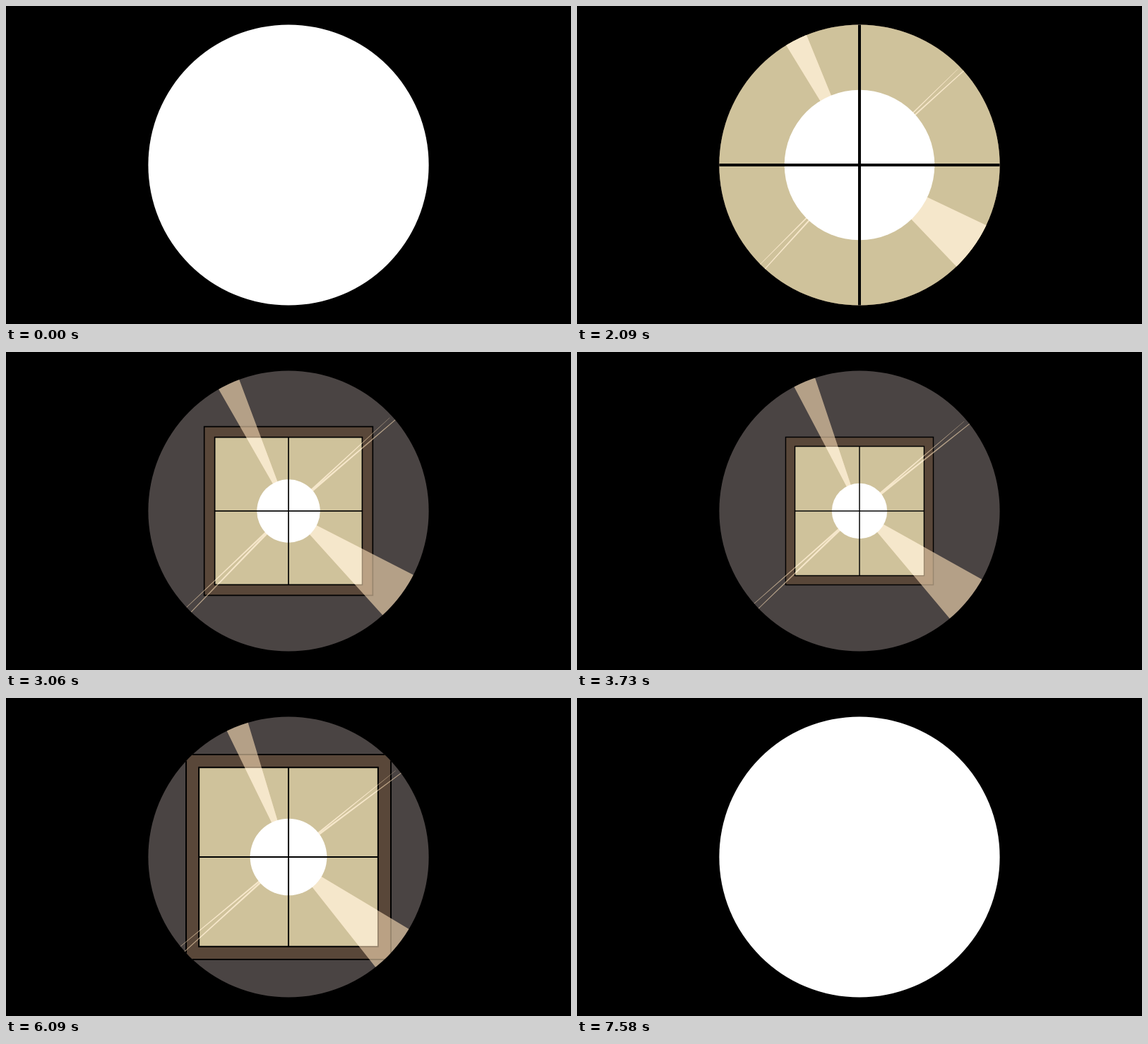
Write an HTML page with a canvas that moves like this. It is 800x450 px and loops after 8090 ms.

```html
<!DOCTYPE html>
<html lang="en">
<head>
<meta charset="utf-8">
<title>Window light</title>
<style>
  html, body { margin: 0; width: 100%; height: 100%; overflow: hidden; background: #000; }
  canvas { display: block; width: 800px; height: 450px; }
</style>
</head>
<body>
<canvas id="stage" width="800" height="450"></canvas>
<script>
const ctx = document.getElementById('stage').getContext('2d');
const LOOP = 8090;
const DISC = 198.6;          // radius of the round view
const NEAR = 235, FAR = 39.2; // lamp radius at both ends of the zoom
const RAD = Math.PI / 180;

const WALL = '#4a4443', FRAME = '#594739', PANE = '#cfc29b';
const GLOW = '#f5e7cb', HAZE = 'rgba(245,216,178,.62)';

const WIDE = [[25.45, 46.25], [238.5, 247.8]];
// angle, length, inner width, outer width
const NEEDLES = [
  [-44.3, 195, 2.8, 0.3],
  [-42.1, 202, 3, 1],
  [135, 200, 2.8, 0.6],
  [132.3, 202, 3, 1]
];

const clamp01 = x => Math.min(1, Math.max(0, x));
const progress = (t, from, to) => clamp01((t - from) / (to - from));

function bezierEase(x, x1, x2) {
  let lo = 0, hi = 1, s = x;
  for (let i = 0; i < 30; i++) {
    s = (lo + hi) / 2;
    const bx = 3 * (1 - s) ** 2 * s * x1 + 3 * (1 - s) * s * s * x2 + s ** 3;
    if (bx < x) lo = s; else hi = s;
  }
  return s * s * (3 - 2 * s);
}

function lampRadius(t) {
  const out = bezierEase(progress(t, 1060, 3560), 0.256, 0.27);
  const back = progress(t, 5750, 6550) ** 3;
  return NEAR + (FAR - NEAR) * (out - back);
}

const crossGrowth = t => progress(t, 580, 730) - progress(t, 7330, 7580);
const swing = t => 3.3 * (1 + Math.cos(Math.PI * (t - 5200) / 3200));

function square(half) {
  ctx.beginPath();
  ctx.rect(-half, -half, 2 * half, 2 * half);
}

function disc(r) {
  ctx.beginPath();
  ctx.arc(0, 0, r, 0, 2 * Math.PI);
}

function beamPath(angle) {
  ctx.beginPath();
  for (const [from, to] of WIDE) {
    ctx.moveTo(0, 0);
    ctx.arc(0, 0, DISC + 4, (from + angle) * RAD, (to + angle) * RAD);
    ctx.closePath();
  }
  for (const [dir, len, inner, outer] of NEEDLES) {
    const c = Math.cos((dir + angle) * RAD), s = Math.sin((dir + angle) * RAD);
    const at = (d, side) => [d * c - side * s, d * s + side * c];
    ctx.moveTo(...at(0, -inner / 2));
    ctx.lineTo(...at(len, -outer / 2));
    ctx.lineTo(...at(len, outer / 2));
    ctx.lineTo(...at(0, inner / 2));
    ctx.closePath();
  }
}

function fill(color) {
  ctx.fillStyle = color;
  ctx.fill();
}

function draw(t) {
  const r = lampRadius(t), angle = swing(t);
  const line = r * 0.0375;
  const outer = r * 8 / 3, inner = r * 7 / 3;

  ctx.setTransform(1, 0, 0, 1, 0, 0);
  ctx.fillStyle = '#000';
  ctx.fillRect(0, 0, 800, 450);
  ctx.translate(400, 225);
  ctx.save();
  disc(DISC);
  ctx.clip();

  if (r > DISC + 2) {
    disc(DISC + 2);
    fill('#fff');
  } else {
    disc(DISC + 2);
    fill(WALL);
    ctx.strokeStyle = '#000';
    ctx.lineWidth = line;
    square(outer);
    fill(FRAME);
    ctx.stroke();
    square(inner);
    fill(PANE);
    ctx.stroke();
    beamPath(angle);
    fill(HAZE);

    // on the glass the light is opaque
    ctx.save();
    square(inner - line / 2);
    ctx.clip();
    beamPath(angle);
    fill(GLOW);
    ctx.restore();

    disc(r);
    fill('#fff');
  }

  const bar = line * crossGrowth(t);
  if (bar > 0) {
    ctx.fillStyle = '#000';
    ctx.fillRect(-bar / 2, -inner, bar, 2 * inner);
    ctx.fillRect(-inner, -bar / 2, 2 * inner, bar);
  }
  ctx.restore();
}

const start = performance.now();
function tick() {
  draw((performance.now() - start) % LOOP);
  requestAnimationFrame(tick);
}
tick();
</script>
</body>
</html>
```
